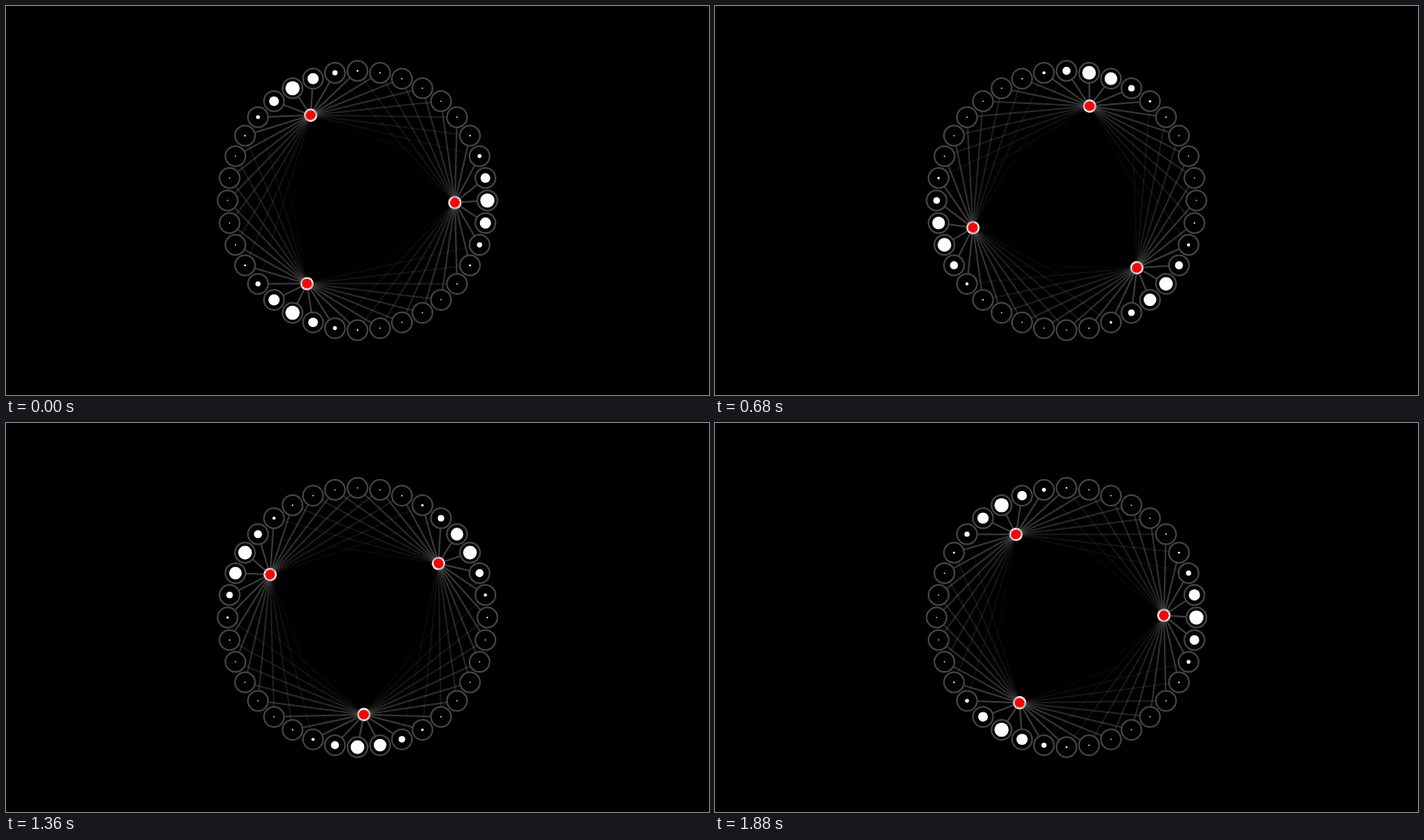
An HTML page with a canvas that plays this animation: 866x480 px, repeating every 1.92 s.

```html
<!DOCTYPE html>
<html lang="en">
<head>
<meta charset="utf-8">
<title>Orbit</title>
<style>
  html, body { margin: 0; width: 100%; height: 100%; overflow: hidden; background: #000; }
  canvas { display: block; }
</style>
</head>
<body>
<canvas id="stage" width="866" height="480"></canvas>
<script>
const ctx = document.getElementById("stage").getContext("2d");
const TAU = Math.PI * 2, RAD = Math.PI / 180;
const CX = 433, CY = 240;
const LOOP = 1920, STEP = 40;
const NODES = 36, DOTS = 3;
const NODE_ORBIT = 160, DOT_ORBIT = 120, REACH = 238;

const polar = (deg, r) => ({
  deg,
  x: CX + r * Math.cos(deg * RAD),
  y: CY + r * Math.sin(deg * RAD)
});

const nodes = Array.from({ length: NODES }, (_, i) => polar(i * 360 / NODES, NODE_ORBIT));

function disc(p, r, color) {
  ctx.fillStyle = color;
  ctx.beginPath();
  ctx.arc(p.x, p.y, r, 0, TAU);
  ctx.fill();
}

function link(a, b) {
  const d = Math.hypot(a.x - b.x, a.y - b.y);
  if (d >= REACH) return;
  ctx.globalAlpha = 0.5 * (1 - (d / REACH) ** 2);
  ctx.beginPath();
  ctx.moveTo(a.x, a.y);
  ctx.lineTo(b.x, b.y);
  ctx.stroke();
}

// Smallest angle between two directions, in degrees
function gap(a, b) {
  const d = Math.abs(a - b) % 360;
  return Math.min(d, 360 - d);
}

function draw(time) {
  const t = Math.floor((time % LOOP) / STEP) * STEP;
  const turn = 1.25 + 120 * t / LOOP;
  const dots = Array.from({ length: DOTS }, (_, i) => polar(turn + i * 360 / DOTS, DOT_ORBIT));

  ctx.fillStyle = "#000";
  ctx.fillRect(0, 0, 866, 480);
  ctx.fillStyle = "#080000";
  ctx.fillRect(0, 476, 866, 4);

  for (const dot of dots) disc(dot, 8.2, "#fff");

  ctx.strokeStyle = "#828282";
  ctx.lineWidth = 2;
  for (const node of nodes) for (const dot of dots) link(node, dot);
  ctx.globalAlpha = 1;

  ctx.strokeStyle = "#464646";
  for (const node of nodes) {
    disc(node, 12.4, "#000");
    ctx.stroke();
    const near = Math.min(...dots.map(dot => gap(dot.deg, node.deg)));
    disc(node, 0.8 + 8 * Math.exp(-near * near / 288), "#fff");
  }

  for (const dot of dots) disc(dot, 6, "#f00");
}

const start = performance.now();
function tick() {
  draw(performance.now() - start);
  requestAnimationFrame(tick);
}
tick();
</script>
</body>
</html>
```
